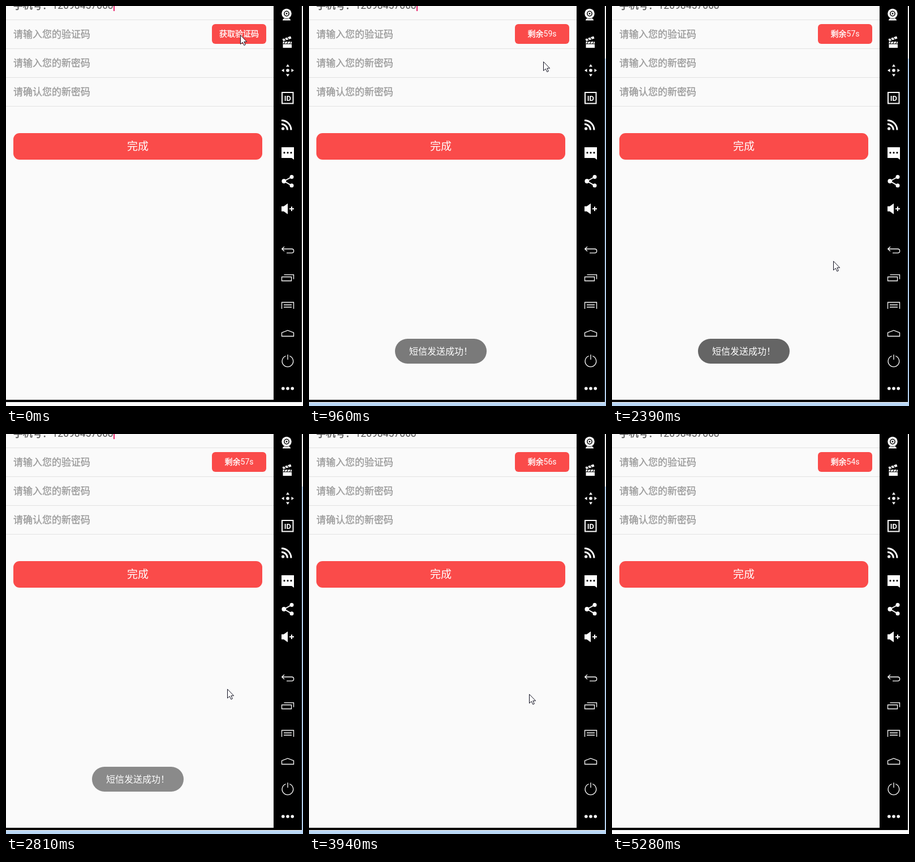
An HTML page that plays this animation: 525x708 px, repeating every 5380 ms.

```html
<!DOCTYPE html>
<html lang="zh-CN">
<head>
<meta charset="utf-8">
<title>验证码倒计时</title>
<style>
  html, body { margin: 0; width: 100%; height: 100%; overflow: hidden; background: #fff; }
  svg { display: block; width: 525px; height: 708px; }
  text { font-family: Roboto, "Noto Sans CJK SC", "Noto Sans CJK", sans-serif; }
  .hint { font-size: 17px; fill: #999; stroke: #999; stroke-width: .3; }
  .phone { font-size: 17px; fill: #555; stroke: #555; stroke-width: .3; }
  .number { font-size: 17.5px; fill: #555; }
  .label { fill: #fff; text-anchor: middle; }
  .strong { stroke: #fff; stroke-width: .35; }
  .line { fill: none; stroke: #fff; stroke-width: 1.3; }
  .thick { stroke-width: 2; }
</style>
</head>
<body>
<svg viewBox="0 0 525 708">
  <rect width="525" height="708" fill="#fdfdfd"/>
  <path id="focus" d="M523 93H525V708H0V702H523Z" fill="#b9d7f5"/>
  <rect width="523" height="701" fill="#000"/>
  <rect width="473" height="697" fill="#fafafa"/>

  <!-- form -->
  <path d="M0 24.5H473M0 75.5H473M0 126.5H473M0 177.5H473" stroke="#e2e2e2"/>
  <text class="phone" x="13" y="5.4">手机号：</text>
  <text class="number" x="81.5" y="5">12098457068</text>
  <rect id="caret" x="190" width="2" height="9" fill="#e8246c"/>
  <text class="hint" x="13" y="56.3">请输入您的验证码</text>
  <text class="hint" x="13" y="107.3">请输入您的新密码</text>
  <text class="hint" x="13" y="158.3">请确认您的新密码</text>
  <rect x="364" y="32" width="96" height="35" rx="6" fill="#fa4b4a"/>
  <text class="label" x="412" y="54" font-size="14"><tspan id="caption" class="strong"></tspan><tspan id="seconds"></tspan></text>
  <rect x="13" y="225" width="440" height="47" rx="11" fill="#fa4b4a"/>
  <text class="label" x="233" y="255.2" font-size="19">完成</text>

  <g id="toast">
    <rect x="152" y="589" width="162" height="44" rx="22" fill="#656565"/>
    <text class="label" x="233" y="617" font-size="16">短信发送成功！</text>
  </g>

  <!-- toolbar -->
  <g fill="#fff">
    <circle cx="496" cy="13.5" r="8.7"/>
    <circle cx="496" cy="13.5" r="4.9" fill="#000"/>
    <circle cx="496" cy="13.5" r="3.4"/>
    <circle cx="496" cy="13.5" r="1.4" fill="#000"/>
    <path d="M489 25.5Q489 22.5 492 22Q496 24 500 22Q503 22.5 503 25.5Z"/>

    <path d="M489.5 63H505V74H489.5ZM488.5 58.5L503 53.5L504.5 57.5L490 62.3Z"/>
    <path d="M492 57L495 60.5M497 55.3L500 58.8M493.5 63L491.5 66.5M498.5 63L496.5 66.5M503.5 63L501.5 66.5M489.5 67H505" stroke="#000" stroke-width="1.2"/>

    <circle cx="498" cy="114" r="2.8"/>
    <path d="M498 103L501 107.5H495ZM498 125L501 120.5H495ZM487 114L491.5 111V117ZM509 114L504.5 111V117Z"/>

    <rect class="line thick" x="488" y="153" width="19.5" height="19.5"/>
    <text x="497.8" y="167.5" font-size="13" font-weight="700" text-anchor="middle">ID</text>

    <circle cx="489.6" cy="217" r="2.6"/>
    <path class="line" style="stroke-width:3" d="M487 209A10.5 10.5 0 0 1 497.5 219.5M487 202.5A17 17 0 0 1 504 219.5"/>

    <path d="M487 250H509V272L505 269H487Z"/>
    <path d="M492 259.7h0M498 259.7h0M504 259.7h0" stroke="#000" stroke-width="3.2" stroke-linecap="round"/>

    <path class="line thick" d="M505 302.5L491.5 310L505 317.8"/>
    <circle cx="491.3" cy="310" r="3.9"/>
    <circle cx="505" cy="302.4" r="3.5"/>
    <circle cx="505" cy="317.8" r="3.5"/>

    <path d="M487 354.5H491L498 349.5V368.5L491 363.5H487Z"/>
    <path class="line thick" d="M501 359H509M505 355V363"/>

    <path class="line" d="M492 426L487.7 430L492 434M488 430H505Q508.7 430 508.7 433.6Q508.7 437.2 505 437.2H496"/>
    <path class="line" d="M487.5 479.5H504.5V486.5H487.5ZM491.5 475.7H508.5V483.5"/>
    <path class="line" d="M487.5 536V524.5H508.5V536M491 529H505M491 533H505"/>
    <path class="line" d="M487.5 584.5V578.2L498 574.2L508.5 578.2V584.5Z"/>
    <path class="line" d="M494.6 619.5A9.8 9.8 0 1 0 501.2 619.5M498 617V626"/>
    <path class="line" style="stroke-width:5.6;stroke-linecap:round" d="M489.8 677h0M498 677h0M506.2 677h0"/>
  </g>

  <path id="pointer" d="M.5 .7V16.6L4.2 13.2L6.8 18.6L9.3 17.5L6.8 12.2H11.6Z" fill="#fff" stroke="#101020"/>
</svg>
<script>
const LOOP = 5380, TICK = 140, LEAD = 40;
const SENT = 3, TICKS_PER_SECOND = 7;
const BLINK = 3.45, BLINK_START = 3.6;

const part = id => document.getElementById(id);
const [focus, caret, caption, seconds, toast, pointer] =
  ['focus', 'caret', 'caption', 'seconds', 'toast', 'pointer'].map(part);

const progress = (tick, from, to) => Math.min(1, Math.max(0, (tick - from) / (to - from)));
const smooth = p => (1 - Math.cos(Math.PI * p)) / 2;
const smoother = p => p ** 3 * (p * (6 * p - 15) + 10);
const show = (el, opacity) => el.setAttribute('opacity', Number(opacity));

// Settle on the button, sweep down to rest, then curve out to the right.
function pointerAt(tick) {
  const settle = progress(tick, 0, 1);
  const sweep = smoother(progress(tick, 5, 11) ** 1.2);
  const exit = progress(tick, 27, 34);
  return [
    414 + 3 * settle - 26 * sweep - 14 * exit + 83 * exit ** 4,
    51 - 3 * settle + 403 * sweep + 241 * exit ** 1.7
  ].map(Math.round);
}

function draw() {
  const tick = Math.floor((performance.now() % LOOP + LEAD) / TICK);
  const counting = tick >= SENT;

  show(focus, tick >= 2 && tick < 38);
  show(caret, Math.floor((tick - BLINK_START) / BLINK) % 2 === 0);
  show(toast, smooth(progress(tick, 4, 8)) - smooth(progress(tick, 19, 22)));
  show(pointer, tick < 35);
  pointer.setAttribute('transform', `translate(${pointerAt(tick)})`);

  caption.textContent = counting ? '剩余' : '获取验证码';
  seconds.textContent = counting ? `${59 - Math.floor((tick - SENT) / TICKS_PER_SECOND)}s` : '';
  requestAnimationFrame(draw);
}
draw();
</script>
</body>
</html>
```
